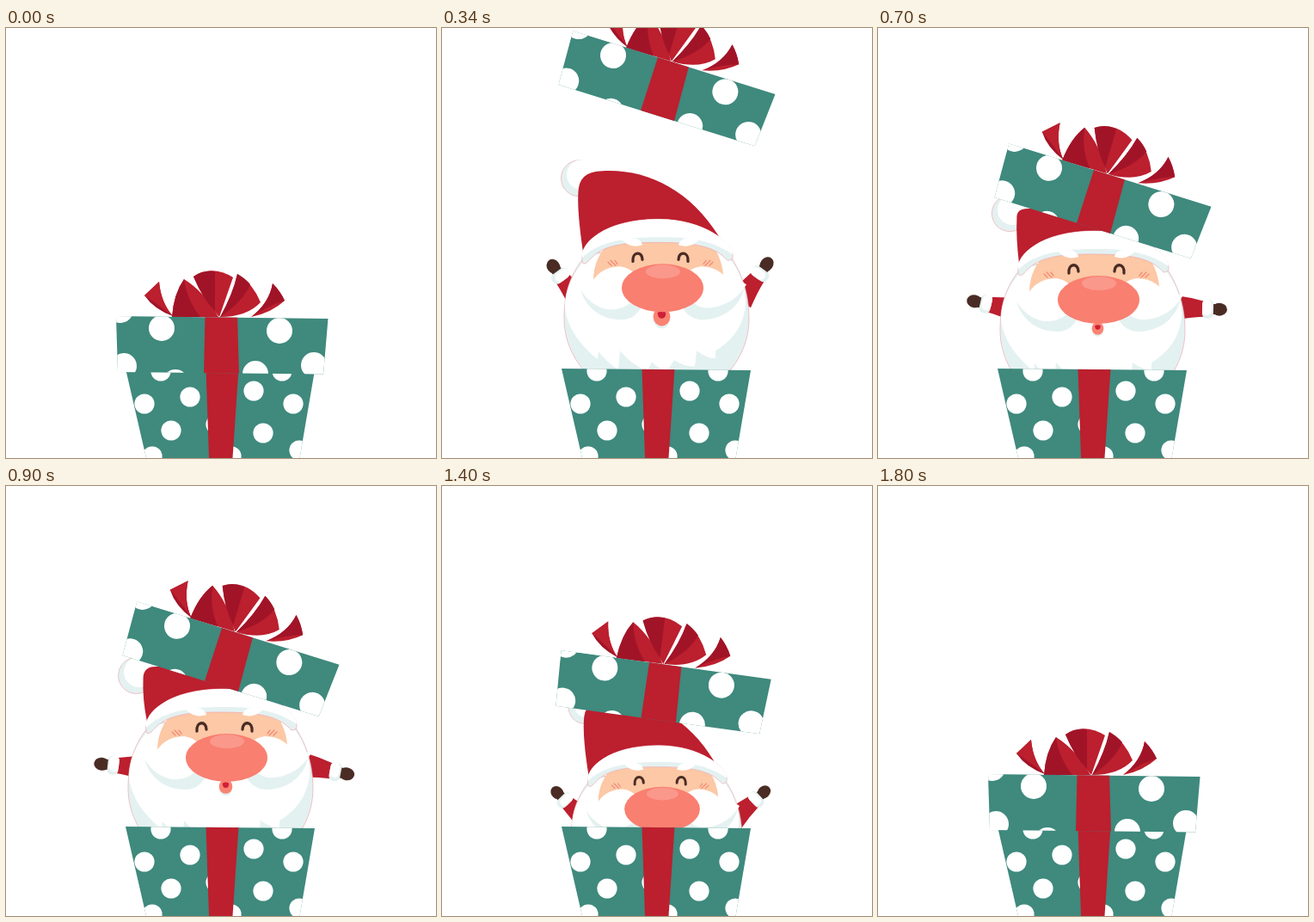
An HTML page for the animation above (2.2 s loop, 500 px wide and 500 px high).

```html
<!DOCTYPE html>
<html lang="en">
<head>
<meta charset="utf-8">
<title>Santa in a gift box</title>
<style>
html, body { margin: 0; width: 100%; height: 100%; overflow: hidden; background: #fff; }
svg { display: block; width: 100vw; height: 100vh; }
.green { fill: #3f897d; }
.red { fill: #bc1f2e; }
.dark { fill: #a11428; }
.white { fill: #fff; }
.shade { fill: #e4f1f1; }
.brown { fill: #4a2c25; }
.edge { stroke: #ecaab2; stroke-width: .7; }
.line { fill: none; stroke-linecap: round; }
</style>
</head>
<body>
<svg viewBox="0 0 500 500">
  <defs>
    <clipPath id="boxShape"><path d="M139 396 359 398 341.500 500 163 500Z"/></clipPath>
    <clipPath id="lidShape"><path d="M128 335 374.500 338 369 402.500 130 400Z"/></clipPath>
    <g id="arm">
      <path class="red" d="M6 -15Q-12 -13 -28 -9V9Q-12 10 6 14Z"/>
      <ellipse class="brown" cx="-46" rx="9" ry="7.500"/>
      <path class="brown" d="M-46 -6H-34V6H-46Z"/>
      <rect class="shade" x="-39" y="-11" width="13" height="22" rx="5.500"/>
      <rect class="white" x="-37" y="-11" width="11" height="18" rx="5"/>
    </g>
    <g id="cheek">
      <path class="white" d="M175 308C180 300 190 291 207 291Q217 292 225 300L226 328H182Z"/>
      <path class="white" d="M206 255C211 265 222 270 233 266Q231 258 221 258Q212 259 206 255Z"/>
      <path class="line" stroke="#4a2c25" stroke-width="3.300" d="M222 285C221 273 233 273 233 283"/>
      <path class="line" stroke="#f28b76" stroke-width="1.300" d="M193 286 197 290M196 284 202 290M201 284 204 288"/>
    </g>
  </defs>

  <g id="santa">
    <use id="armLeft" href="#arm"/>
    <use id="armRight" href="#arm"/>
    <g id="pom">
      <circle class="shade edge" r="21"/>
      <circle class="white" cx="3" cy="-4" r="17.500"/>
    </g>
    <path id="hat" class="red"/>
    <path class="shade edge" d="M170 275C147 300 142 325 142 352C142 382 158 410 182 428H318C342 410 357 382 357 352C357 325 350 297 330 272Z"/>
    <path class="white" d="M172 277C148 302 143 322 143 340C147 366 163 384 181 399L182 390Q192 403 205 411L207 389Q220 405 239 413L244 402Q252 411 262 412L270 400Q283 408 294 407L296 389Q309 398 318 398L318 389C343 374 351 354 353 336C354 315 346 294 328 274Z"/>
    <path class="shade" d="M161 318C167 338 184 354 211 353C222 352 229 345 233 335H278C283 347 292 354 306 353C329 351 345 338 351 318L330 300H180Z"/>
    <path class="white" d="M157 312C167 329 181 342 199 341C211 340 219 335 226 326H286C292 335 300 340 312 339C331 337 345 327 354 312L330 297H180Z"/>
    <path fill="#fcc8a5" d="M176 307C176 288 184 273 196 262H312C322 276 328 292 327 308L300 318H200Z"/>
    <path class="shade edge" d="M163 285C160 264 189 236 252 236C306 236 339 265 338 279Q338 284 332 284C319 270 302 263 250 263C205 263 185 267 169 286Q164 290 163 285Z"/>
    <path class="white" d="M163 281C160 264 189 236 252 236C306 236 339 265 338 277C319 264 296 256 250 257C206 257 179 265 163 281Z"/>
    <use href="#cheek"/>
    <use href="#cheek" transform="translate(508 0) scale(-1 1)"/>
    <g id="mouth">
      <ellipse class="shade" cy="4" rx="9.500" ry="10"/>
      <ellipse fill="#fa8373" rx="10.300" ry="11"/>
      <path fill="#d01f38" d="M-5 -5Q0 -8 5 -5Q5 2 0 2Q-5 2 -5 -5Z"/>
    </g>
    <ellipse fill="#f97f70" cx="256.500" cy="316" rx="47.500" ry="28"/>
    <ellipse fill="#fa988c" cx="257" cy="297" rx="20" ry="8"/>
  </g>

  <g clip-path="url(#boxShape)">
    <path class="green" d="M130 390H370V500H130Z"/>
    <g id="boxDots" class="white"></g>
    <path class="red" d="M232.500 396H270.500L263.500 500H236Z"/>
  </g>

  <g id="lid">
    <path class="dark" d="M178 295L161 311Q172 327 194 335Q180 319 178 295Z"/>
    <path class="red" d="M178 295L161 311Q172 318 194 335Q180 319 178 295Z"/>
    <path class="red" d="M207 292Q195 309 193 336H247Q231 307 207 292Z"/>
    <path class="dark" d="M207 292Q195 309 193 336H226Q210 316 207 292Z"/>
    <path class="red" d="M218 289Q240 275 264 290L248 336Q229 315 218 289Z"/>
    <path class="dark" d="M218 289Q229 281 243 283V329Q228 314 218 289Z"/>
    <path class="red" d="M269 286Q287 297 296 319Q280 336 249 336Q264 309 269 286Z"/>
    <path class="dark" d="M269 286Q278 291 284 298Q276 318 249 336Q264 309 269 286Z"/>
    <path class="red" d="M310 297Q319 306 324 317Q309 331 285 336Q306 320 310 297Z"/>
    <path class="dark" d="M310 297Q319 306 324 317Q309 321 285 336Q306 320 310 297Z"/>
    <g clip-path="url(#lidShape)">
      <path class="green" d="M120 330H380V410H120Z"/>
      <g id="lidDots" class="white"></g>
      <path class="red" d="M231.500 334H269L271 404H230Z"/>
    </g>
  </g>
</svg>
<script>
const LOOP = 2200, STEP = 20;
const el = id => document.getElementById(id);
const place = (id, transform) => el(id).setAttribute('transform', transform);

const mix = (a, b, u) => a + (b - a) * u;
const phase = (t, from, to) => Math.min(1, Math.max(0, (t - from) / (to - from)));
const smooth = (t, from, to) => { const u = phase(t, from, to); return u * u * (3 - 2 * u); };
const arc = u => 4 * u * (1 - u);

function addDots(id, radius, centers) {
  el(id).innerHTML = centers.map(([x, y]) => `<circle cx="${x}" cy="${y}" r="${radius}"/>`).join('');
}
addDots('boxDots', 11.6, [[180, 399], [161, 437], [214, 429], [192, 468], [170, 498], [244, 461],
  [262, 498], [321, 399], [288, 422], [334, 437], [299, 471], [341, 491]]);
addDots('lidDots', 15, [[181, 349], [318, 352], [137, 393], [358, 392], [290, 402], [197, 412], [133, 328]]);

// The lid is thrown up, lands on the hat, then hops back and rocks on its corner.
function drawLid(t) {
  const toss = phase(t, 20, 430), back = phase(t, 1240, 1580), rock = phase(t, 1450, 1800);
  const open = smooth(t, 20, 200) - smooth(t, 1280, 1500);
  const x = 130 + 5.5 * open;
  const y = 400 - 203 * (toss - smooth(t, 1240, 1580)) - 256 * arc(toss) - 34 * arc(back);
  const angle = 16.7 * open - 8.6 * (1 - 0.4 * rock) * Math.sin(2 * Math.PI * rock);
  place('lid', `translate(${x} ${y}) rotate(${angle}) translate(-130 -400)`);
}

function drawHat(weight, sag) {
  const side = [158 + weight * (4 - 8 * sag), 205 + weight * (14 + 16 * sag)];
  const top = [188 - 14 * weight, 177 + 33 * weight];
  const crown = 174 + 34 * weight;
  place('pom', `translate(${160 - weight * (6 + 8 * sag)} ${186 + weight * (28 + 21 * sag)})`);
  el('hat').setAttribute('d', `M164 274Q${side[0] - 1} ${side[1] + 24} ${side}Q${side[0]} ${top[1]} ${top}`
    + `C${top[0] + 50} ${crown} 288 ${crown + 24} 322 256L250 250L170 272Z`);
}

function drawSanta(t) {
  const hidden = 1 - smooth(t, 20, 200) + smooth(t, 1280, 1600);
  const weight = smooth(t, 320, 430) - smooth(t, 1240, 1420);
  const wave = Math.sin(Math.PI * phase(t, 240, 1560));
  const drop = 215 * hidden - 15 * (1 - weight);
  place('santa', `translate(250 ${396 + drop}) scale(${1 - 0.24 * hidden}) translate(-250 -396)`);
  place('armLeft', `translate(157 328) rotate(${mix(68, 6, wave)})`);
  place('armRight', `translate(351 326) scale(-1 1) rotate(${mix(75, -11, wave)})`);
  place('mouth', `translate(255.5 349.5) scale(${1 - 0.43 * weight * (1 - phase(t, 500, 1420))})`);
  drawHat(weight, phase(t, 500, 1220) ** 2);
}

const start = performance.now();
function frame() {
  const elapsed = (performance.now() - start) % LOOP;
  const t = Math.floor(elapsed / STEP) * STEP;
  drawSanta(t);
  drawLid(t);
  requestAnimationFrame(frame);
}
frame();
</script>
</body>
</html>
```
